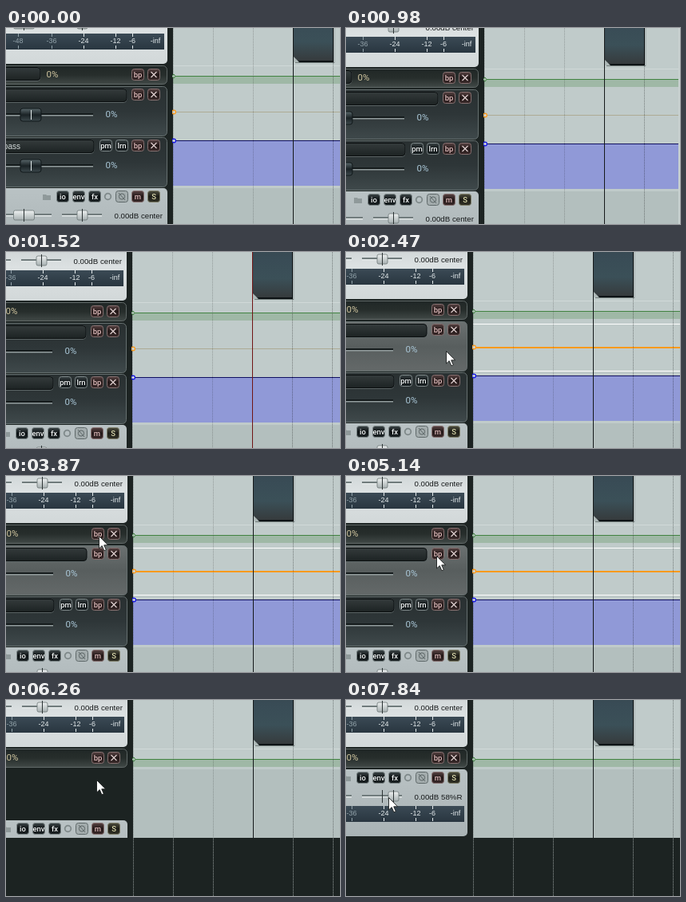
Recreate the animation shown at these times as an HTML page. Size 418x246 px, loop 8000 ms.

```html
<!DOCTYPE html>
<html lang="en">
<head>
<meta charset="utf-8">
<title>Envelope lanes</title>
<style>
html, body { margin: 0; width: 100%; height: 100%; overflow: hidden; background: #1c2322; }
svg { display: block; width: 418px; height: 246px; }
text { font-family: "Liberation Sans", Arial, sans-serif; }
.pct { font: 11.5px Roboto, sans-serif; }
.cap { font: 500 9.5px Roboto, sans-serif; }
</style>
</head>
<body>
<svg id="stage" viewBox="0 0 418 246" xmlns="http://www.w3.org/2000/svg"></svg>
<script>
const LOOP = 8000, LANE = 64, TRACK = 86;
const LEFT = -80, EDGE = 159;

// time, then view offset
const view = [[0, 50, -14], [700, 45, -14], [830, 29, -12], [980, 14, -10], [1100, 7, -6],
  [1240, 3, -1], [1370, 0, 2], [1520, -1, 2], [1660, 0, 1], [1900, 0, 0]];

// time, then pointer tip (off stage when hidden)
const pointer = [[0, -50, -50], [150, 138, 221], [270, 168, 19], [420, 166, 4], [550, -50, -50],
  [1780, 143, 84], [1900, 133, 101], [2050, 129, 111], [2170, 126, 119], [2320, 125, 124],
  [3030, 117, 100], [3180, 112, 73], [3330, 109, 57], [3450, 108, 47], [3600, 104, 44],
  [3720, 113, 65], [3870, 116, 75], [4150, 116, 76], [4300, 119, 124], [4450, 118, 112],
  [4600, 116, 110], [4720, 115, 112], [4870, 114, 105], [4990, 113, 100],
  [6970, 106, 94], [7090, 76, 97], [7210, 42, 108], [7340, 22, 118], [7460, 39, 123],
  [7600, 44, 122], [7720, 49, 122], [7840, 53, 122]];

// time, then pan percentage
const panning = [[0, 0], [7600, 19], [7720, 39], [7840, 58]];

const at = (list, t) => list.reduce((hit, row) => row[0] <= t ? row : hit).slice(1);

const rect = (x, y, w, h, fill, more = '') =>
  `<rect x="${x}" y="${y}" width="${w}" height="${h}" fill="${fill}" ${more}/>`;
const text = (x, y, s, size, fill, more = '') =>
  `<text x="${x}" y="${y}" font-size="${size}" fill="${fill}" ${more}>${s}</text>`;
const line = (x1, y1, x2, y2, color, more = '') =>
  `<path d="M${x1} ${y1}L${x2} ${y2}" stroke="${color}" fill="none" ${more}/>`;
const grad = (id, ...stops) => `<linearGradient id="${id}" x2="0" y2="1">` +
  stops.map((c, i) => `<stop offset="${i / (stops.length - 1)}" stop-color="${c}"/>`).join('') +
  '</linearGradient>';
const group = (id, body) => `<g id="${id}">${body}</g>`;

const tones = {
  dark: ['url(#btn)', '#7d8788', '#f2f5f5'],
  red: ['url(#btnRed)', '#857070', '#dfbcbc'],
  olive: ['url(#btnOlive)', '#7d7d68', '#dddcae']
};

function button(x, y, label, tone) {
  const [fill, edge, ink] = tones[tone];
  const face = rect(x + .5, y + .5, 15, 14, fill, `rx="3" stroke="${edge}"`);
  const mark = label === 'x'
    ? `<path d="M${x + 4.5} ${y + 4}l7 7m0 -7l-7 7" stroke="#e0d0d0" stroke-width="1.2"/>`
    : text(x + 8, y + 10.5, label, 9.5, ink, 'class="cap" text-anchor="middle"');
  return face + mark;
}

const field = (right, y) =>
  rect(LEFT, y + .5, right - LEFT, 17, 'none', 'rx="4" stroke="#5d6667"') +
  rect(LEFT, y + .5, right - LEFT, 16, 'url(#field)', 'rx="4" stroke="#0b0f10"');

function slider(y) {
  return rect(LEFT, y - 2, 59 - LEFT, 2, '#151b1c') + rect(LEFT, y, 59 - LEFT, 1.5, '#939d9e') +
    rect(-32, y - 8, 26, 16, 'url(#knob)', 'rx="3" stroke="#11181a"') +
    line(-18.5, y - 6, -18.5, y + 6, '#e6eeee');
}

// panel of an open envelope lane, local to its top
function lane(id, right, label, learn) {
  return group(id,
    `<rect class="back" x="${LEFT}" y=".5" width="${151.5 - LEFT}" height="62" rx="5" fill="url(#lane)" stroke="#667070"/>` +
    field(right, 3) + text(-32, 15, label, 10, '#d3dadb', 'text-anchor="end"') +
    (learn ? button(67, 3, 'pm', 'dark') + button(87, 3, 'lrn', 'dark') : '') +
    button(107, 3, 'bp', 'red') + button(127, 3, 'x', 'red') +
    slider(36) + text(74.5, 39, '0%', 11.5, '#a9c6d6', 'class="pct"'));
}

function meter(y) {
  const marks = [[-35, '-48'], [7, '-36'], [47, '-24'], [87, '-12'], [108, '-6'], [137, '-inf']];
  return rect(LEFT, y, 148 - LEFT, 20, 'url(#meter)') + marks.map(([x, s], i) => {
    const ink = i < 2 ? '#92a2aa' : '#e4eaec';
    const ticks = line(x + .5, y, x + .5, y + 4, ink) + line(x + .5, y + 15, x + .5, y + 19, ink);
    return (i < 5 ? ticks : '') + text(x, y + 12, s, 9, ink, 'text-anchor="middle"');
  }).join('');
}

const thumb = (x, y, w) =>
  rect(x - w / 2, y - 6, w, 12, 'url(#thumb)', 'rx="2" stroke="#6d7676" stroke-width=".8"') +
  line(x, y - 8, x, y + 8, '#2c3334');
const groove = (x1, x2, y) =>
  rect(x1, y - 2, x2 - x1, 2, '#707b7c') + rect(x1, y, x2 - x1, 1.5, '#e3e8e8');

// track panel, local to its top
function track(id, fill) {
  return group(id, rect(LEFT, 0, 152 - LEFT, TRACK - 2, fill, 'rx="5"') +
    `<path d="M-4 8h4l1 1h5v6h-10z" fill="#8f999a"/>` +
    button(13, 3, 'io', 'dark') + button(33, 3, 'env', 'dark') + button(53, 3, 'fx', 'dark') +
    `<circle cx="77.5" cy="10.5" r="3.8" fill="none" stroke="#7f898a" stroke-width="1.8"/>` +
    rect(87.5, 3.5, 15, 14, '#a3acad', 'rx="3" stroke="#5f696a"') +
    `<circle cx="95" cy="10.5" r="3.6" fill="none" stroke="#5c6667"/>` + line(91, 6, 99, 15, '#5c6667') +
    button(107, 3, 'm', 'red') + button(127, 3, 'S', 'olive') +
    groove(LEFT, 7, 34) + thumb(-27.5, 34, 26) +
    groove(20, 70, 34) + line(45.5, 26, 45.5, 42, '#2c3334') +
    `<g class="pan">${thumb(45.5, 34, 13)}</g>` +
    text(85.5, 37.5, '0.00dB', 9.7, '#16191a') + text(119, 37.5, 'center', 9.7, '#16191a', 'class="where"') +
    meter(46));
}

const dot = (y, color) =>
  `<circle cx="160" cy="${y}" r="2.4" fill="#d5dddc" stroke="${color}" stroke-width="1.3"/>`;
const wide = (y, h, fill) => rect(EDGE, y, 320, h, fill);

// dotted rulers, fainter before the playhead
const rulers = [159, 209, 259, 359, 409].map(x =>
  `<path class="gridTop" stroke="#000" stroke-opacity="${x < 309 ? .24 : .4}" stroke-dasharray="1 1" data-x="${x + .5}"/>` +
  `<path class="gridLow" stroke="#929b9a" stroke-dasharray="1 1" data-x="${x + .5}"/>`).join('');

const stage = document.getElementById('stage');
stage.innerHTML = '<defs>' +
  grad('btn', '#3c4547', '#0d1214', '#1c2325') + grad('btnRed', '#574242', '#231818', '#3a2a2a') +
  grad('btnOlive', '#4c4c3c', '#1d1d17', '#323226') + grad('field', '#343b3c', '#1d2323') +
  grad('lane', '#293031', '#2e3638', '#3f494b') + grad('laneOn', '#6b7171', '#585e5e', '#646969') +
  grad('strip', '#202726', '#272e2c', '#414947') + grad('knob', '#59676b', '#1a2225', '#3d494d') +
  grad('thumb', '#eef1f1', '#a7b0b1') + grad('meter', '#3b4a55', '#293640') +
  grad('topTrack', '#c3cacb', '#dce1e2', '#d2d8d9') + grad('track', '#b9c2c4', '#b1babc', '#a9b3b5') +
  grad('item', '#34404a', '#36464f', '#394c56', '#3b5058', '#363b3d') + '</defs>' +
  group('world',
    rect(LEFT, -40, 620, 400, '#1c2322') +
    wide(-40, 127, '#c0cbca') +
    wide(61, 1, '#d0d9d8') + wide(75, 9, '#9fb8a6') + wide(74, 1, '#418341') +
    `<path d="M157 74.5l3 -2.5l2 2.5l-2 2.5z" fill="#b9c9bf" stroke="#3a803a"/>` +
    group('orangeArea', wide(87, 64, '#c0cbca') +
      `<g id="frame">${wide(90, 1, '#fff')}${wide(149, 1, '#fff')}</g>` +
      `<rect id="orange" x="${EDGE}" width="320"/>` + dot(119.5, '#ff9a1a')) +
    group('blueArea', wide(0, 64, '#c0cbca') + wide(4, 57, '#9099d7') + wide(4, 1, '#101060') + dot(4.5, '#1212e8')) +
    group('trackArea', wide(0, TRACK, '#b3bfbe')) +
    rect(309, -40, 51, 97, '#0d1315') + rect(310, -40, 49, 95, 'url(#item)') +
    line(361, -40, 361, 58, '#87918f', 'opacity=".6"') + line(312, 57.5, 361, 57.5, '#727d7b') +
    '<path d="M309 49l8 8h-8z" fill="#aeb9b8"/>' +
    rulers +
    '<path id="playhead"/>' +
    rect(LEFT, -40, 158 - LEFT, 400, '#1c2322') +
    track('upper', 'url(#topTrack)') +
    rect(LEFT, 61.5, 151.5 - LEFT, 23, 'url(#strip)', 'rx="5" stroke="#606867"') +
    field(-7, 63) + text(.5, 76, '0%', 11.5, '#cfc49f', 'class="pct"') +
    button(107, 65, 'bp', 'red') + button(127, 65, 'x', 'red') +
    lane('orangeLane', 101, '', false) + lane('blueLane', 60, 'Bypass', true) +
    track('lower', 'url(#track)') +
    `<rect id="cover" x="${LEFT}" y="173" width="${158 - LEFT}" height="150" fill="#1c2322"/>`) +
  rect(416, 0, 2, 246, '#c9d2d1', 'id="margin"') +
  '<path id="arrow" d="M.5 .5V16L4.2 12.6L6.9 18.8L9.3 17.7L6.7 11.8H11.6Z" fill="#fff" stroke="#1a1d1d" stroke-width=".9"/>';

const $ = s => stage.querySelector(s);
const move = (s, x, y) => $(s).setAttribute('transform', `translate(${x} ${y})`);
const show = (s, on) => $(s).setAttribute('visibility', on ? 'visible' : 'hidden');
const set = (s, attrs) => { for (const k in attrs) $(s).setAttribute(k, attrs[k]); };

move('#upper', 0, -25);
move('#orangeLane', 0, 87);

function draw(t) {
  const [vx, vy] = at(view, t), [px, py] = at(pointer, t), [pan] = at(panning, t);
  const removed = t < 5270 ? 0 : t < 6260 ? 1 : 2;
  const blueY = removed ? 87 : 87 + LANE;
  const areaY = 87 + LANE * (2 - removed);
  const lagging = t >= 6260 && t < 6390;
  const panelY = lagging ? areaY + LANE : areaY;
  const picked = t >= 2470;

  move('#world', vx, vy);
  move('#arrow', px, py);
  show('#margin', t >= 830 && t < 1240);

  show('#orangeLane', removed === 0);
  show('#orangeArea', removed === 0);
  show('#frame', picked && removed === 0);
  set('#orangeLane .back', { fill: picked ? 'url(#laneOn)' : 'url(#lane)' });
  set('#orange', picked ? { y: 119, height: 2, fill: '#ff9a1a' } : { y: 119, height: 1, fill: '#adab94' });

  show('#blueLane', removed < 2);
  show('#blueArea', removed < 2);
  move('#blueLane', 0, blueY);
  move('#blueArea', 0, blueY);

  move('#trackArea', 0, areaY);
  move('#lower', 0, panelY);
  show('#cover', lagging);
  const end = areaY + TRACK;
  stage.querySelectorAll('.gridTop').forEach(p => p.setAttribute('d', `M${p.dataset.x} -40V${end}`));
  stage.querySelectorAll('.gridLow').forEach(p => p.setAttribute('d', `M${p.dataset.x} ${end}V340`));
  set('#playhead', { d: `M309.5 -40V${end}`, stroke: t >= 1520 && t < 1660 ? '#701414' : '#15191a' });

  move('#lower .pan', Math.floor(pan / 4), 0);
  $('#lower .where').textContent = pan ? pan + '%R' : 'center';
}

const start = performance.now();
function tick() {
  draw((performance.now() - start) % LOOP);
  requestAnimationFrame(tick);
}
draw(0);
requestAnimationFrame(tick);
</script>
</body>
</html>
```
